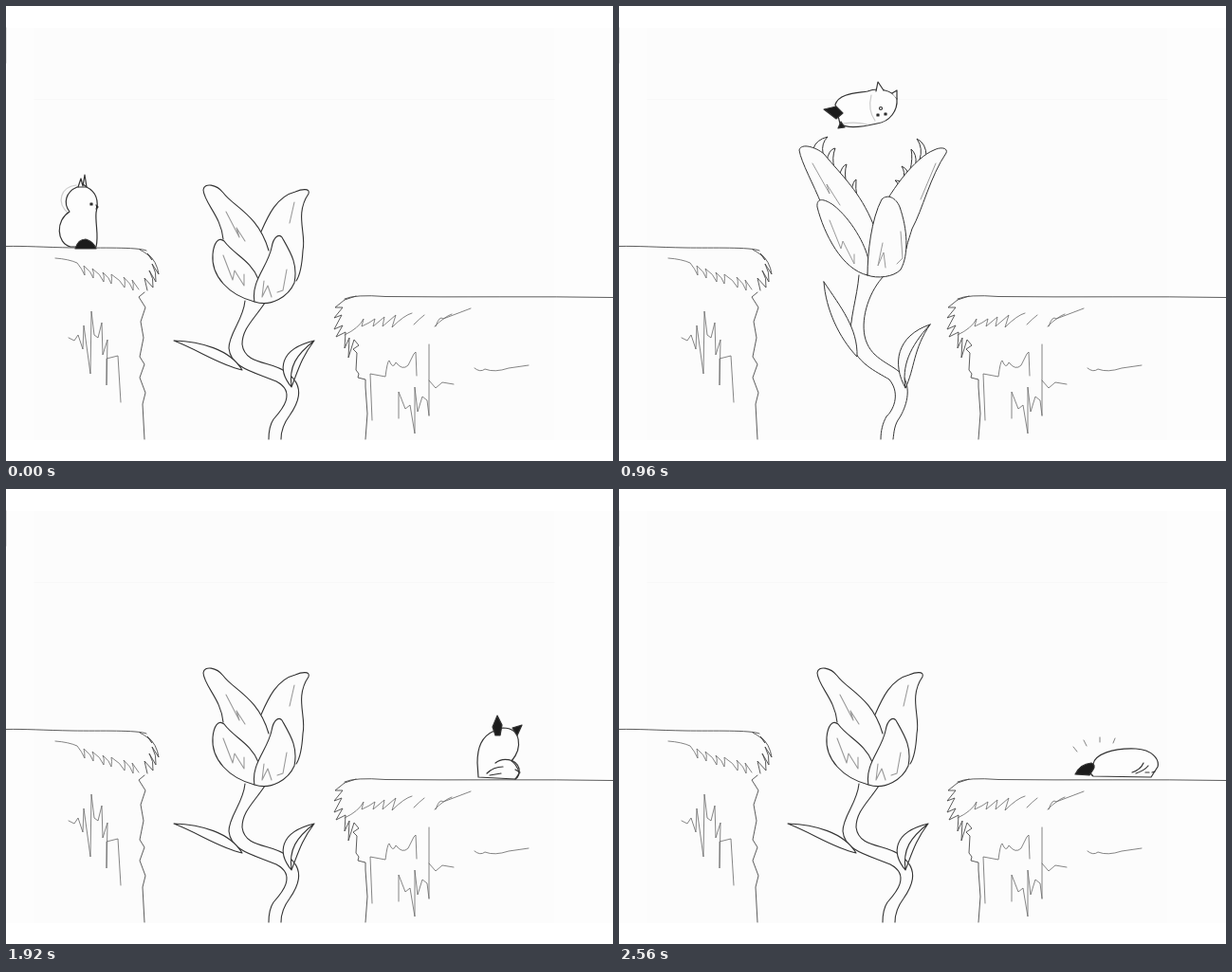
An HTML page without scripts that plays this animation: 640x480 px, repeating every 3040 ms.

```html
<!DOCTYPE html>
<html lang="en">
<head>
<meta charset="utf-8">
<title>Leap over the flower</title>
<style>
html, body { margin: 0; width: 100%; height: 100%; overflow: hidden; background: #fff; }
svg { display: block; width: 640px; height: 480px; }
path, ellipse { fill: none; stroke: #333; stroke-linecap: round; stroke-linejoin: round; }
.cliff path { stroke: #4a4a4a; stroke-width: .9; }
.cliff .soft { stroke: #666; stroke-width: .8; }

/* Flower: every part shares one morph between four shapes */
.flower { transform-origin: 270px 458px; animation: settle 3.04s step-end infinite; }
.flower path { fill: #fcfcfc; animation: morph 3.04s infinite; }
.flower .line { fill: none; }
.flower .shade { fill: none; stroke: #999; }
.flower .teeth { animation: morph 3.04s infinite, teeth-on 3.04s step-end infinite; }
@keyframes settle {
  0%, 63.157% { transform: none; }
  50% { transform: translateX(1px) scaleY(1.014); }
  81.578% { transform: translateX(1px); }
}
@keyframes morph {
  0%, 5.263% { d: var(--rest); stroke-width: 1.1px; animation-timing-function: steps(6); }
  21.052% { d: var(--crouch); stroke-width: 1.7px; animation-timing-function: steps(4); }
  31.578% { d: var(--reach); stroke-width: 1px; animation-timing-function: steps(3); }
  39.473% { d: var(--snap); stroke-width: 1.3px; animation-timing-function: steps(4); }
  50%, 100% { d: var(--rest); stroke-width: 1.1px; }
}
@keyframes teeth-on { 0%, 36.842% { opacity: 0; } 18.421% { opacity: 1; } }

/* Creature: one group per pose, moved on an 80 ms beat */
.pose { opacity: 0; animation: 3.04s step-end infinite; }
.pose > g { transform-box: fill-box; transform-origin: 50% 100%; animation: 3.04s step-end infinite; }
.pose path, .pose ellipse { fill: #fdfdfd; stroke-width: 1.2; }
.pose .ink { fill: #1c1c1c; }
.pose .line { fill: none; }
.pose .soft { fill: none; stroke: #ccc; }
.sit { animation-name: sit-on; }
.sit > g { animation-name: sit; }
.leap { animation-name: leap-on; }
.leap > g { animation-name: leap; }
.glide { animation-name: glide-on; }
.glide > g { animation-name: glide; }
.dive { animation-name: dive-on; }
.dive > g { animation-name: dive; }
.land { animation-name: land-on; }
.land > g { animation-name: land; }
.turn { animation-name: turn-on; }
.turn > g { animation-name: turn; }
.nap { animation-name: nap-on; }
.nap > g { animation-name: nap; }
.rays { animation-name: rays-on; }
@keyframes sit-on { 0% { opacity: 1; } 15.789% { opacity: 0; } }
@keyframes leap-on { 0%, 26.315% { opacity: 0; } 15.789% { opacity: 1; } }
@keyframes glide-on { 0%, 36.842% { opacity: 0; } 26.315% { opacity: 1; } }
@keyframes dive-on { 0%, 47.368% { opacity: 0; } 36.842% { opacity: 1; } }
@keyframes land-on { 0%, 68.421% { opacity: 0; } 47.368% { opacity: 1; } }
@keyframes turn-on { 0%, 81.578% { opacity: 0; } 68.421% { opacity: 1; } }
@keyframes nap-on { 0% { opacity: 0; } 81.578% { opacity: 1; } }
@keyframes rays-on { 0% { opacity: 0; } 84.21% { opacity: 1; } }
@keyframes sit {
  0% { transform: none; }
  7.894% { transform: scale(1.04, .92); }
  10.526% { transform: scale(1.1, .82); }
  13.157% { transform: translate(16px, -26px) rotate(14deg); }
}
@keyframes leap {
  0%, 15.789% { transform: translate(-76px, 50px) rotate(-14deg); animation-timing-function: steps(2); }
  21.052% { transform: translate(0, 0) rotate(0deg); animation-timing-function: steps(2); }
  26.315%, 100% { transform: translate(29px, -3px) rotate(8deg); }
}
@keyframes glide {
  0%, 26.315% { transform: translate(-29px, 0) rotate(-8deg); animation-timing-function: steps(2); }
  31.578% { transform: translate(0, 0) rotate(0deg); animation-timing-function: steps(2); }
  36.842%, 100% { transform: translate(60px, 24px) rotate(30deg); }
}
@keyframes dive {
  0%, 36.842% { transform: translate(-30px, -15px) rotate(-12deg); animation-timing-function: steps(1); }
  39.473% { transform: translate(0, 0) rotate(0deg); animation-timing-function: steps(3); }
  47.368%, 100% { transform: translate(155px, 112px) rotate(10deg); }
}
@keyframes land { 0% { transform: scale(1.1, .86); } 50% { transform: none; } 63.157% { transform: translate(8px, 3px); } 65.789% { transform: translate(16px, 5px); } }
@keyframes turn { 0% { transform: translate(-7px, -2px); } 71.052% { transform: none; } 76.315% { transform: scale(1.02, .96); } }
@keyframes nap { 0% { transform: scale(.95, 1.2); } 84.21% { transform: none; } }
</style>
</head>
<body>
<svg viewBox="0 0 640 480">
  <rect y="23" width="640" height="435" fill="#fdfdfd"/>
  <rect x="30" y="23" width="548" height="435" fill="#fcfcfc"/>
  <path d="M30 98.5H578" style="stroke:#f8f8f8"/>
  <path d="M0 23V60" style="stroke:#bbb;stroke-width:.8"/>

  <g class="cliff">
    <path d="M0 253.5C20 253 40 254.5 70 255S138 254 148 258"/>
    <path d="M141 257Q151 262 154 268L149 261Q159 269 161 283L154 272Q159 281 158 291L151 279Q156 287 155 297L146 287L149 300"/>
    <path class="soft" d="M52 266Q66 267 75 271Q80 277 83 284Q83 278 82 274Q90 280 92 287Q93 280 91 277Q100 283 103 291Q104 284 102 281Q109 286 111 293Q112 287 111 283Q121 289 125 297Q126 289 124 286Q132 293 134 300Q135 293 133 289L140 299"/>
    <path d="M146 302L140 307L147 318L142 333L145 350L141 370L146 378L141 392L147 408L144 420L146 457"/>
    <path class="soft" d="M66 350L72 353L76 347L81 362L82 337L89 388L90 322L93 347L97 350L101 334L102 368L107 352L106 400V372L118 369L121 418"/>
    <path d="M640 307.5C560 306 480 307.5 400 306.5Q368 304 357 309"/>
    <path d="M369 306L357 310L347 318L355 318L346 329L354 326L346 341L355 337L348 349L358 344L357 361L362 350L361 371L367 352L372 358L366 362L370 366L369 384L372 388L371 392L379 394L379 402L381 430L379 457"/>
    <path class="soft" d="M357 347Q372 340 377 330L375 338Q384 334 389 330L387 338L399 328L397 338L411 326L407 339Q420 326 428 324M430 336Q436 330 441 326M452 338Q462 328 470 325M453 338Q457 326 461 330L490 319"/>
    <path class="soft" d="M386 437L384 388L400 391Q402 375 404 374Q408 384 411 376Q418 385 424 379L430 367L432 365L433 390M446 357V432M414 435V407L421 425L426 421L431 451V402L434 428L439 412L444 416L446 432M446 395L453 403L460 397L472 399M494 382Q500 387 505 383Q515 387 530 382L551 379"/>
  </g>

  <g class="flower">
    <path class="line" style="
      --rest:path('M252 311C250 332 235 345 235 361C237 383 265 387 285 396C308 408 289 428 282 436C278 442 277 450 277 457M273 313C262 330 249 340 249 357C252 380 282 374 296 387C318 402 306 422 299 432C293 440 290 450 290 457');
      --crouch:path('M247 322C240 335 236 350 238 364C246 378 255 396 280 396C308 400 296 418 288 430C280 442 278 450 277 457M271 325C258 336 251 346 252 360C262 386 284 376 299 380C324 396 312 410 305 426C298 440 296 450 295 457');
      --reach:path('M253 284C251 308 243 330 244 352C248 376 272 386 285 394C298 410 288 428 282 433C278 440 276 448 276 457M280 284C264 300 255 328 259 348C264 372 285 376 298 388C310 404 302 424 296 434C290 442 290 450 289 457');
      --snap:path('M255 284C254 306 238 328 243 350C248 380 270 380 286 394C298 406 284 424 279 434C276 442 276 450 276 457M279 285C264 300 252 324 259 348C264 376 288 372 300 384C314 400 298 418 292 430C288 442 288 450 288 457')"/>
    <path style="
      --rest:path('M177 353C205 354 236 362 249 384C224 378 205 364 177 353Z');
      --crouch:path('M193 364C222 364 242 374 253 388C230 384 214 372 193 364Z');
      --reach:path('M216 291C234 318 252 340 251 370C232 350 218 320 216 291Z');
      --snap:path('M210 308C232 324 250 345 255 374C238 350 222 330 210 308Z')"/>
    <path style="
      --rest:path('M325 353C288 362 286 384 301 402C308 384 312 370 325 353M301 402C298 380 306 368 325 353');
      --crouch:path('M329 348C296 372 290 384 299 404C312 394 318 376 329 348M299 404C304 386 312 370 329 348');
      --reach:path('M328 336C292 348 288 378 302 403C312 382 310 362 328 336M302 403C298 380 306 360 328 336');
      --snap:path('M327 336C296 344 286 374 299 401C316 386 318 362 327 336M299 401C302 376 310 360 327 336')"/>
    <path class="teeth" style="
      --rest:path('M220 194q0-2 0-2l2 2M228 198q0-2 0-2l2 2M240 210q0-1 0-1l1 1M250 220q0-1 0-1l1 1M304 197q0-2 0-2l2 1M310 194q0-2 0-2l2 2M292 205q0-1 0-1l1 1M285 215q0-1 0-1l1 1');
      --crouch:path('M223 194q1-6-1-10q5 4 5 13M230 201q0-6 4-9q-1 6 1 15M240 222q0-1 0-1l1 1M250 240q0-1 0-1l1 1M308 198q0-6-5-9q7 1 9 7M316 194q0-4-4-7q6 1 8 6M297 212q0-1 0-1l1 1M288 225q0-1 0-1l1 1');
      --reach:path('M205 150q3-9 15-12q-7 7-5 17M219 164q2-13 9-14q-4 10-1 21M232 180q3-12 8-13q-3 9 0 22M245 195q2-11 5-12q-1 9 1 19M317 162q4-12-3-22q10 5 10 18M307 173q3-12 1-22q6 5 5 15M300 183q2-8-2-14q7 3 7 10M295 193q1-5-4-9q6 0 8 4');
      --snap:path('M254 160q0-2 0-2l2 2M256 164q0-2 0-2l2 2M260 180q0-1 0-1l1 1M262 190q0-1 0-1l1 1M276 160q0-2 0-2l2 1M278 164q0-2 0-2l2 2M274 180q0-1 0-1l1 1M274 190q0-1 0-1l1 1')"/>
    <path style="
      --rest:path('M269 238C276 222 285 201 305 196C312 193 321 192 319 198C304 220 317 240 313 258C312 275 310 284 306 290');
      --crouch:path('M266 268C275 240 294 206 318 193C326 190 332 192 330 199C312 222 312 250 313 275C314 280 314 284 313 290');
      --reach:path('M268 232C285 195 312 160 332 152C340 148 347 150 345 155C328 180 320 215 309 235C306 245 304 250 303 256');
      --snap:path('M267 208C270 190 266 165 270 154C274 145 284 144 288 152C290 165 280 180 290 195C305 212 310 228 309 246C309 249 309 250 308 252')"/>
    <path style="
      --rest:path('M229 246C227 222 209 208 208 194C209 186 222 188 229 197C240 212 266 220 277 258');
      --crouch:path('M223 246C220 225 209 208 208 194C210 187 220 188 225 196C236 212 250 246 270 284');
      --reach:path('M213 208C206 190 192 165 190 152C192 144 208 149 216 156C236 180 254 196 268 230');
      --snap:path('M243 206C256 180 247 165 251 148C255 140 264 141 268 152C270 170 264 200 265 238')"/>
    <path style="
      --rest:path('M262 312C235 305 216 285 218 262C219 250 224 243 230 248C240 262 258 268 266 288C266 297 264 305 262 312');
      --crouch:path('M253 325C228 320 212 298 217 272C220 255 225 240 231 239C236 245 238 262 252 279C256 297 252 305 253 325');
      --reach:path('M262 284C235 278 216 240 209 212C208 202 216 203 226 210C245 225 260 252 263 268C263 274 263 279 262 284');
      --snap:path('M264 285C240 278 230 245 234 212C236 204 240 203 243 207C250 220 262 228 264 240C263 255 262 270 264 285')"/>
    <path style="
      --rest:path('M262 312C258 290 276 275 280 255C282 243 288 240 291 244C300 260 308 272 304 292C298 306 280 318 262 312');
      --crouch:path('M253 325C246 305 262 290 275 280C285 270 283 258 288 248C292 252 316 275 313 295C305 315 285 330 253 325');
      --reach:path('M262 284C262 260 266 225 277 204C283 198 292 202 296 212C304 235 306 262 297 278C290 286 272 288 262 284');
      --snap:path('M264 285C260 270 262 230 268 212C272 204 276 206 282 210C298 220 308 235 308 248C308 270 298 290 264 285')"/>
    <path class="shade" style="
      --rest:path('M232 217l14 27l-3-10l9 14M304 207l-5 22M229 263l10 26l2-10l10 16l0-12M272 290l-2 17l6-12l4 12M296 278l-4 22l-6 2');
      --crouch:path('M222 206l18 36l-2-8l16 26M312 206l-16 34M234 268l4 32l3-14l6 26l2-10M276 298l-5 20l8-14l0 12M302 290l-4 18l-8 6');
      --reach:path('M204 166l18 32l-3-10l14 22M334 166l-16 38M222 226l12 30l2-8l12 24l0-10M278 250l-5 24l6-14l2 16M297 238l2 28l-6 6');
      --snap:path('M258 165l-4 25l1-6l-2 20M276 165l2 28M240 238l6 28l2-10l8 20l0-12M276 248l-1 22l5-12l3 14M292 236l1 28l6-14')"/>
  </g>

  <g class="pose sit"><g>
    <path class="soft" d="M74 189C58 191 52 207 66 219M69 213Q79 219 88 212"/>
    <path d="M75 191C63 196 60 208 67 217C52 226 53 250 68 254H95C98 242 94 230 95 218C98 206 95 196 85 191Z"/>
    <path class="line" d="M76 191L79 182L81 190L83 178L85 191L80 187"/>
    <path class="ink" d="M73 256Q76 246 84 246Q92 248 95 256ZM89 208h2v2h-2ZM95 210l2 2l-2 2"/>
  </g></g>

  <g class="pose leap"><g>
    <path d="M174 122C170 108 182 100 196 99C206 98 214 90 222 92C236 90 240 98 237 110C230 122 215 130 200 134C188 138 176 134 174 122Z"/>
    <path class="soft" d="M178 124C178 108 202 102 211 115C212 128 190 136 182 130M212 100Q209 114 220 122"/>
    <path d="M216 95L215 81L224 92M234 96L240 93L238 101"/>
    <path class="ink" d="M161 137L171 120L176 131ZM182 136L188 134L184 140ZM221 113h2v2h-2ZM227 111h1v1h-1Z"/>
  </g></g>

  <g class="pose glide"><g>
    <path d="M228 104C232 92 250 92 262 90C272 86 288 88 293 98C294 110 286 122 272 124C255 128 240 130 233 124Z"/>
    <path class="soft" d="M266 94Q262 110 270 121M236 124Q250 122 262 125"/>
    <path d="M271 90L273 80L279 89M288 92L293 89L293 98"/>
    <path class="ink" d="M216 109L229 106L236 113L229 119ZM234 122L231 129L238 128ZM272 114h2v2h-2ZM280 113h2v2h-2Z"/>
    <ellipse cx="276" cy="108" rx="1.5" ry="1.5"/>
  </g></g>

  <g class="pose dive"><g>
    <path d="M325 133C318 150 335 168 345 178C355 186 372 186 375 172C378 150 362 130 348 124Z"/>
    <path class="soft" d="M334 142Q348 140 356 156M362 164L368 152L370 166"/>
    <path class="ink" d="M325 116L344 124L340 133L328 135ZM313 137L325 138L321 146ZM346 164l3 1l-2 2Z"/>
    <ellipse cx="350" cy="174" rx="2.5" ry="4" style="fill:#777"/>
    <ellipse cx="358" cy="170" rx="3" ry="5" style="fill:#ddd;stroke:#888"/>
  </g></g>

  <g class="pose land"><g>
    <path d="M507 252C493 258 489 270 489 286L490 301L529 303L533 297C532 290 527 285 525 284C537 270 535 249 516 249Z"/>
    <path class="line" d="M508 286C515 280 530 281 533 292Q534 300 529 303M499 297Q506 290 516 290M502 299L514 297M529 293L534 296"/>
    <path class="ink" d="M510 236L515 246L513 257L508 257L505 248ZM526 249L536 246L531 257Z"/>
  </g></g>

  <g class="pose turn"><g>
    <path d="M519 263C510 275 512 295 522 306L555 286C556 268 548 256 527 258Z"/>
    <path d="M522 304C530 296 540 292 544 286C558 282 570 292 570 308L521 310ZM570 296L579 299L570 304M520 305L536 298"/>
    <path class="ink" d="M515 250Q525 256 525 268Q524 274 518 273Q513 262 515 250ZM544 248L548 252V262L541 260Z"/>
  </g></g>

  <g class="pose nap"><g>
    <path d="M500 290C502 280 520 273 545 274C562 275 570 285 568 293L561 304L500 303C495 300 497 293 500 290Z"/>
    <path class="line" d="M541 299Q550 296 553 289M545 300Q554 297 558 292M555 299h4M562 299l3-1"/>
    <path class="ink" d="M481 301Q486 290 498 289Q503 291 500 296L496 302Z"/>
  </g></g>
  <g class="pose rays"><path class="line" d="M479 272l4 5M490 265l3 6M507 262v5M523 263l-2 5" style="stroke:#777;stroke-width:.9"/></g>
</svg>
</body>
</html>
```
